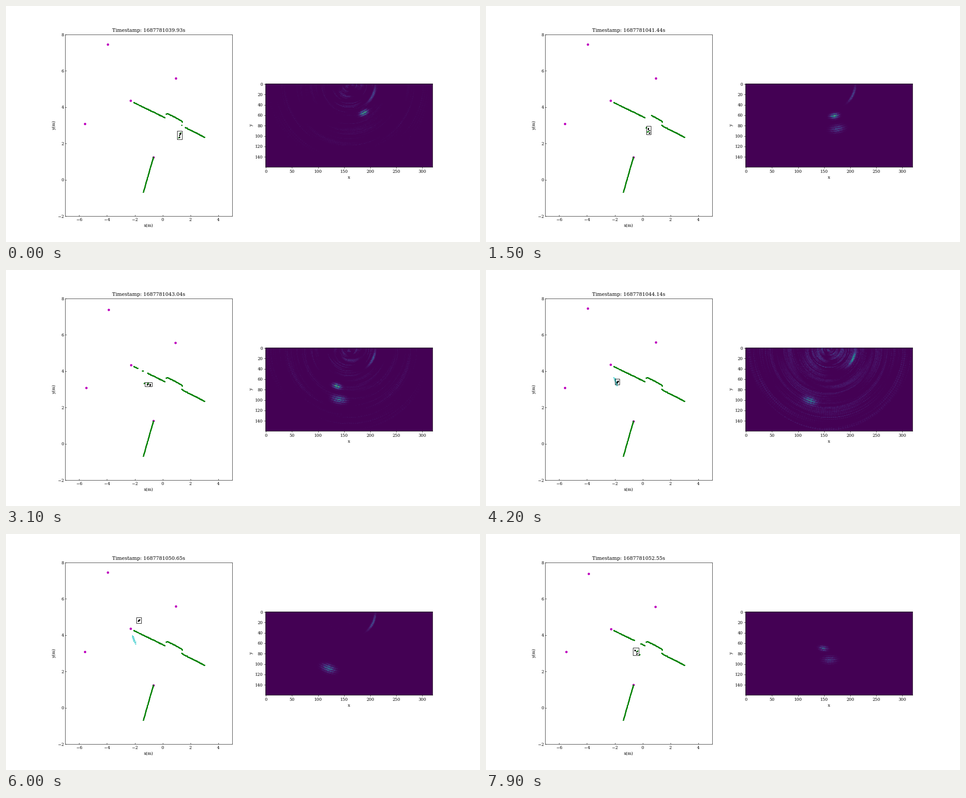
A matplotlib script that plays this animation: 1058x529 px, repeating every 8000 ms.

```python
import numpy as np
import matplotlib.pyplot as plt
from matplotlib.animation import FuncAnimation
from matplotlib.patches import Rectangle

FRAMES, STEP = 80, 100

plt.rcParams["font.family"] = "DejaVu Serif"
plt.rcParams["toolbar"] = "None"

# Walker's way points: frame, x, y
WALK = np.array([(0, 1.22, 2.47), (15, .31, 2.77), (31, -1.2, 3.34),
                 (42, -1.96, 3.44), (48, -2.53, 3.69), (53, -2.8, 3.85),
                 (60, -2.07, 3.76), (79, -.31, 3.03)])
MIRROR = np.array([.355, 1.06])   # offset of the echo reflected behind the wall
POSTS = np.array([(-3.95, 7.45), (.945, 5.605), (-2.31, 4.355),
                  (-5.59, 3.10), (-.665, 1.26)])
SWAY = (0, .9, 0, 1, .9)
WALLS = [
    [(-2.08, 4.265), (-1.77, 4.15)],
    [(-1.68, 4.115), (.15, 3.435)],
    [(.235, 3.62), (.33, 3.655), (.715, 3.52), (1.33, 3.26), (1.39, 3.18)],
    [(1.35, 3.03), (1.49, 2.94), (3.0, 2.365)],
    [(-.67, 1.27), (-1.39, -.65)]]


def dotted(path, gap=.028):
    p = np.array(path)
    run = np.r_[0, np.cumsum(np.hypot(*np.diff(p, axis=0).T))]
    d = np.linspace(0, run[-1], int(run[-1] / gap) + 2)
    return np.c_[np.interp(d, run, p[:, 0]), np.interp(d, run, p[:, 1])]


wall = np.vstack([dotted(w) for w in WALLS])
wall += np.random.default_rng(4).normal(0, .006, wall.shape)
wall_angle = np.arctan2(wall[:, 0], wall[:, 1])
near = wall[:, 1] < 1.5

Y, X = np.mgrid[0:160, 0:320].astype(float)
R, TH = np.hypot(X - 160, Y), np.arctan2(Y, X - 160)
RI = np.minimum(R.astype(int), 199)
BASE = np.random.default_rng(9).random(200)


def bump(n):
    return np.exp(-((n - 45) / 9) ** 2)


def stamp(n):
    # the recording skips a beat once and then pauses before the walk back
    return (1687781039.93 + .1 * n + .01 * (n >= 7) + .1 * (n >= 45)
            + 4.61 * (n >= 54))


def walker(n):
    return np.array([np.interp(n, WALK[:, 0], WALK[:, k]) for k in (1, 2)])


def hidden(n):
    return walker(n)[0] < -1.7


def stride(n):
    turn = 1.2 * np.cos(1.064 * n)
    return (.065 if hidden(n) else .13) * np.array([np.cos(turn), np.sin(turn)])


def estimate(n):
    """Tracked position: lags the walker, or jumps to the mirrored echo."""
    return walker(n) + MIRROR if 45 <= n < 66 else walker(max(n - 2, 0))


def scan(n):
    """Wall points not shadowed by the legs, plus the legs themselves."""
    if hidden(n):
        return wall
    step = stride(n)
    legs = np.array([walker(n) - step, walker(n) + step])
    seen = np.ones(len(wall), bool)
    for x, y in legs:
        seen &= np.abs(wall_angle - np.arctan2(x, y)) > .1 / np.hypot(x, y)
    return np.vstack([wall[seen | near], legs - (.025, .012), legs + (.025, .012)])


def cloud(n):
    if not hidden(n):
        return np.empty((0, 2))
    x, y = walker(n)
    rows, most = 7, round(-3.3 * x - 4.4)
    pts = []
    for i in range(rows):
        dots = most if 0 < i < rows - 1 else max(1, most - 2)
        for j in range(dots):
            a, b = i - (rows - 1) / 2, j - (dots - 1) / 2
            pts.append((x + .036 * a + .065 * b, y - .072 * a + .03 * b))
    return np.array(pts)


def rings(rng, loud):
    prof = .65 * BASE + .35 * rng.random(200)
    prof[158:] = 0
    phase = np.cumsum(rng.normal(0, .7, 200))
    cut = np.interp(loud, [0, .1, .34], [.7, .55, .1])
    env = np.clip(prof[RI] * (.6 + .4 * np.cos(3 * TH + phase[RI])) - cut, 0, 1)
    far = np.clip((R - 35) / 25, 0, 1)
    dots = np.abs(np.sin(1.45 * R + phase[0])) * (1 - far + far * np.abs(np.cos(110 * TH)))
    return 1.2 * loud * env / (1 - cut) * dots * np.exp(-R / (60 + 400 * loud))


def lobe(place, wide, deep):
    x, y = 23 * place[0], 22.5 * place[1]
    r = np.hypot(x, y)
    s, d = (TH - np.arctan2(y, x)) * r, R - r
    ticks = np.abs(np.cos(1.25 * s + .5 * d) * np.cos(.8 * d))
    return np.exp(-(s / wide) ** 2 / 2 - (d / deep) ** 2 / 2) * ticks


def radar(n):
    rng = np.random.default_rng(100 + n)
    speckle = .4 + .9 * rng.random(R.shape)
    loud = .34 * bump(n) + (n < 36) * .17 * np.cos(np.pi * n / 30) ** 2
    img = rings(rng, loud)
    arc = np.exp(-((R - 50) / 1.4) ** 2 / 2 - ((TH - .42) / .2) ** 2 / 2)
    img += (.25 + .35 * bump(n)) * np.clip((77 - n) / 15, 0, 1) * arc
    img += .85 * np.sin(np.pi * n / 90) * lobe(walker(n) + MIRROR, 8, 4.5)
    if not hidden(n):
        img += (1.2 if n < 45 else .6) * lobe(estimate(n), 5, 3)
    return np.clip(img * speckle, 0, 1)


fig, (left, right) = plt.subplots(1, 2, figsize=(16, 8), dpi=66.125)
fig.subplots_adjust(bottom=.109, top=.879)
left.set(xlim=(-7, 5), ylim=(-2, 8), xlabel="x(m)", ylabel="y(m)")
left.tick_params(direction="in")
right.set(xlabel="x", ylabel="y")
title = left.set_title("")


def marks(color, size, z):
    return left.plot([], [], "o", color=color, ms=size, mew=0, zorder=z)[0]


posts = marks("m", 5.8, 2)
lidar = marks("g", 3.1, 3)
unseen = marks("c", 2.5, 4)
target = marks("k", 3, 5)
frame = left.add_patch(Rectangle((0, 0), 1, 1, fill=False, ec="k", lw=1, zorder=6))
view = right.imshow(radar(0), cmap="viridis", vmin=0, vmax=1)

ROW = np.cos(np.linspace(0, np.pi, 6))[:, None]
SCATTER = np.random.default_rng(2).normal(0, .02, (6, 2))


def draw(n):
    title.set_text(f"Timestamp: {stamp(n):.2f}s")
    drift = POSTS * (-.021, -.0125) + (0, .03)
    posts.set_data(*(POSTS + SWAY[n % 5] * drift).T)
    lidar.set_data(*scan(n).T)
    unseen.set_data(*cloud(n).T)
    mid, step = estimate(n), stride(n)
    target.set_data(*(mid + ROW * step + SCATTER).T)
    half = np.abs(step) + (.12, .11)
    frame.set_bounds(*(mid - half), *(2 * half))
    view.set_data(radar(n))
    return title, posts, lidar, unseen, target, frame, view


anim = FuncAnimation(fig, draw, frames=FRAMES, interval=STEP, repeat=True,
                     repeat_delay=0, blit=False)
plt.show()
```
